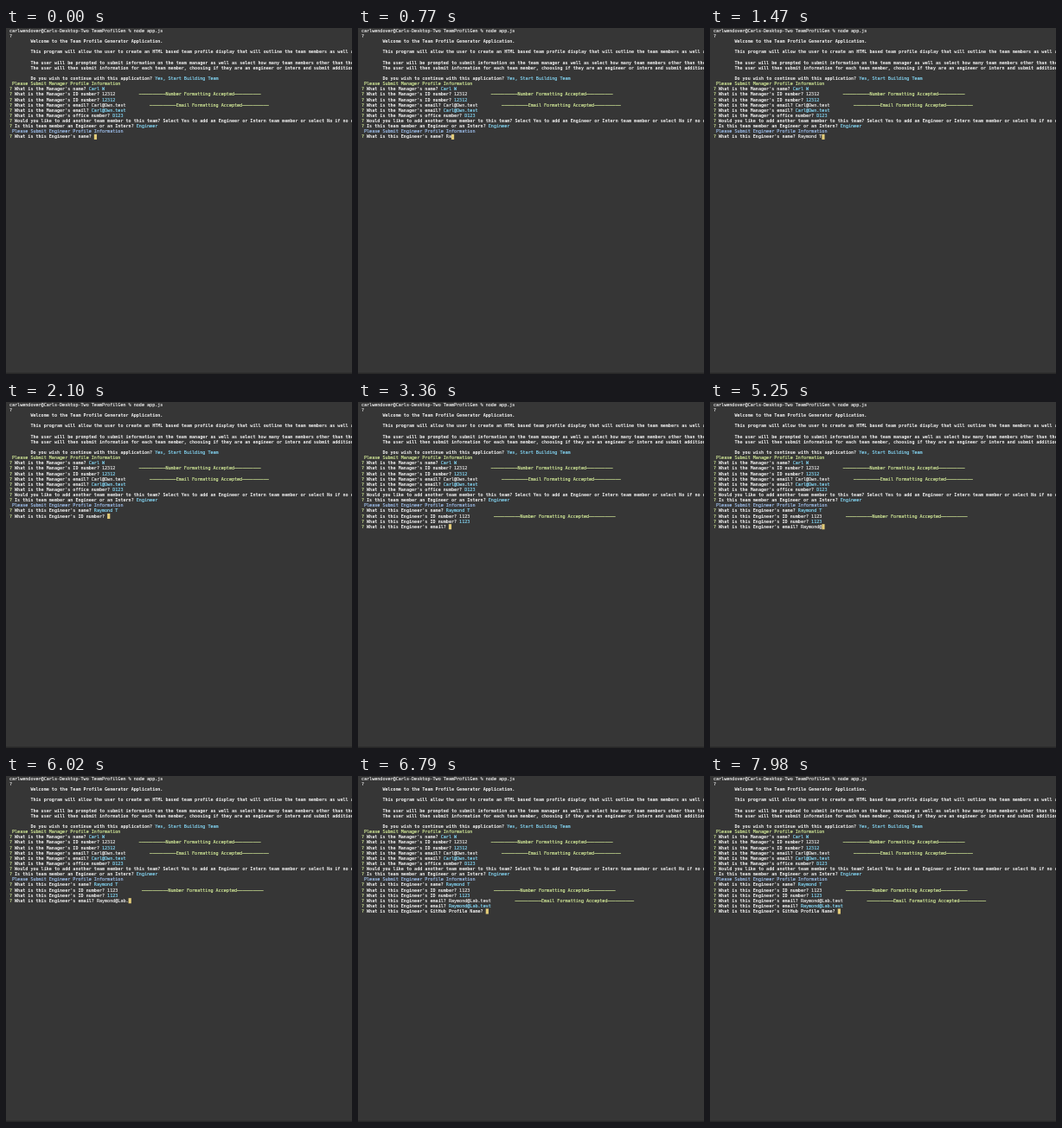
Write an HTML page with a canvas that moves like this. It is 400 px wide and 400 px high and loops after 8000 ms.

```html
<!DOCTYPE html>
<html lang="en">
<head>
<meta charset="utf-8">
<title>Terminal session</title>
<style>
  html, body { margin: 0; width: 100%; height: 100%; overflow: hidden; background: #363636; }
  canvas { display: block; width: 400px; height: 400px; }
</style>
</head>
<body>
<canvas id="screen"></canvas>
<script>
const LOOP = 8000;
const COLUMN = 3.06, ROW = 6.12, LEFT = 3.9, BASELINE = 5;
const FONT_SIZE = COLUMN / 0.602;
const ZOOM = 20; // text is set large and scaled down for exact fractional placement

const WHITE = '#f2f2f2', GREY = '#e6e6e6', GREEN = '#d3ea98', CYAN = '#84d6f4', BLUE = '#9fc0ee';
const CURSOR = '#e2cb78';

const canvas = document.getElementById('screen');
const ctx = canvas.getContext('2d');
const density = window.devicePixelRatio || 1;
canvas.width = canvas.height = 400 * density;

// Only white text is bold; other text gets a hairline stroke, like smoothed screen type.
function write(text, column, row, color) {
  const bold = color === WHITE;
  ctx.save();
  ctx.translate(LEFT + column * COLUMN, BASELINE + row * ROW);
  ctx.scale(1 / ZOOM, 1 / ZOOM);
  ctx.font = `${bold ? 'bold' : 'normal'} ${FONT_SIZE * ZOOM}px "DejaVu Sans Mono", monospace`;
  ctx.fillStyle = ctx.strokeStyle = color;
  ctx.lineWidth = 0.16 * ZOOM;
  ctx.lineJoin = 'round';
  ctx.fillText(text, 0, 0);
  if (!bold) ctx.strokeText(text, 0, 0);
  ctx.restore();
}

// Draws a prompt line and returns the column after it.
function ask(row, question, answer, color = CYAN) {
  const start = question.length + 3;
  write('?', 0, row, GREEN);
  write(question, 2, row, WHITE);
  write(answer, start, row, color);
  return start + answer.length;
}

// A validated answer is echoed with a note, then repeated as confirmed.
function confirm(row, question, answer, kind) {
  const end = ask(row, question, answer, GREY);
  const dashes = '—'.repeat(10);
  write(`${dashes}${kind} Formatting Accepted${dashes}`, end + 9, row, GREEN);
  ask(row + 1, question, answer);
}

function drawHistory() {
  write('carlwendover@Carls-Desktop-Two TeamProfilGen % node app.js', 0, 0, GREY);
  write('?', 0, 1, GREY);
  write('Welcome to the Team Profile Generator Application.', 8, 2, WHITE);
  write('This program will allow the user to create an HTML based team profile display that will outline the team members as well as', 8, 4, WHITE);
  write('The user will be prompted to submit information on the team manager as well as select how many team members other than the manager', 8, 6, WHITE);
  write('The user will then submit information for each team member, choosing if they are an engineer or intern and submit additional', 8, 7, WHITE);
  write('Do you wish to continue with this application?', 8, 9, WHITE);
  write('Yes, Start Building Team', 55, 9, CYAN);
  write('Please Submit Manager Profile Information', 1, 10, GREEN);
  ask(11, "What is the Manager's name?", 'Carl W');
  confirm(12, "What is the Manager's ID number?", '12312', 'Number');
  confirm(14, "What is the Manager's email?", 'Carl@Own.test', 'Email');
  ask(16, "What is the Manager's office number?", 'D123');
  ask(17, 'Would you like to add another team member to this team? Select Yes to add an Engineer or Intern team member or select No if no other', '');
  ask(18, 'Is this team member an Engineer or an Intern?', 'Engineer');
  write('Please Submit Engineer Profile Information', 1, 19, BLUE);
}

const prompts = [
  { question: "What is this Engineer's name?", answer: 'Raymond T',
    keys: [560, 700, 840, 910, 980, 1050, 1190, 1330, 1470], enter: 1820 },
  { question: "What is this Engineer's ID number?", answer: '1123', kind: 'Number',
    keys: [2380, 2520, 2800, 2940], enter: 3290 },
  { question: "What is this Engineer's email?", answer: 'Raymond@Lab.test', kind: 'Email',
    keys: [4340, 4410, 4480, 4620, 4690, 4830, 4970, 5250, 5530, 5670, 5810, 5950, 6090, 6300, 6370, 6510],
    enter: 6650 },
  { question: "What is this Engineer's GitHub Profile Name?", answer: '', keys: [], enter: Infinity }
];

function drawPrompts(time) {
  let row = 20;
  for (const { question, answer, kind, keys, enter } of prompts) {
    if (time < enter) {
      const typed = answer.slice(0, keys.filter(key => key <= time).length);
      const column = ask(row, question, typed, GREY);
      ctx.fillStyle = CURSOR;
      ctx.fillRect(LEFT + column * COLUMN, row * ROW + 0.4, 3.2, ROW);
      return;
    }
    if (kind) {
      confirm(row, question, answer, kind);
      row += 2;
    } else {
      ask(row, question, answer);
      row++;
    }
  }
}

function draw(now) {
  ctx.setTransform(density, 0, 0, density, 0, 0);
  ctx.fillStyle = '#363636';
  ctx.fillRect(0, 0, 400, 400);
  ctx.fillStyle = '#282828';
  ctx.fillRect(0, 398.5, 400, 1.5);
  drawHistory();
  drawPrompts(now % LOOP);
}

const began = performance.now();
function frame() {
  draw(performance.now() - began);
  requestAnimationFrame(frame);
}
frame();
</script>
</body>
</html>
```
